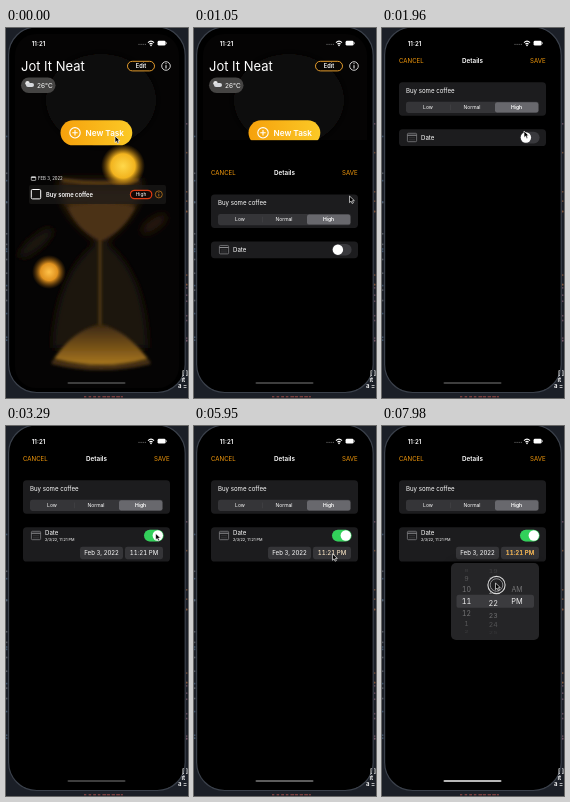
An HTML page for the animation above (8000 ms loop, 182 by 370 pixels).

```html
<!DOCTYPE html>
<html lang="en">
<head>
<meta charset="utf-8">
<title>Task list</title>
<style>
html, body { margin: 0; width: 100%; height: 100%; overflow: hidden; background: #1b1f27; }
svg { display: block; width: 100%; height: 100%; }
text { font-family: Inter, Roboto, "Liberation Sans", sans-serif; font-size: 6.1px; fill: #fff; white-space: pre; }
.b { font-weight: 600; }
.m { text-anchor: middle; }
.o { fill: #f59a0b; }
.tab { font-variant-numeric: tabular-nums; }
.line { fill: none; stroke: #fff; stroke-width: 1; }
</style>
</head>
<body>
<svg viewBox="0 0 182 370" preserveAspectRatio="none">
  <defs>
    <clipPath id="screen"><rect x="9" y="6" width="164" height="354" rx="21"/></clipPath>
    <clipPath id="popClip"><rect x="69" y="137" width="88" height="77" rx="5"/></clipPath>
    <linearGradient id="gold"><stop stop-color="#f6a10c"/><stop offset="1" stop-color="#fbc926"/></linearGradient>
    <linearGradient id="sand" x2="0" y2="1"><stop stop-color="#3a2710"/><stop offset=".6" stop-color="#7a5418"/><stop offset="1" stop-color="#a87720"/></linearGradient>
    <linearGradient id="bulb" x2="0" y2="1"><stop stop-color="#1d140c"/><stop offset=".25" stop-color="#4a3013"/><stop offset="1" stop-color="#2a1a0b"/></linearGradient>
    <radialGradient id="orb"><stop stop-color="#ffd84a"/><stop offset=".55" stop-color="#f2b41f"/><stop offset="1" stop-color="#a86a08" stop-opacity="0"/></radialGradient>
    <radialGradient id="orb2"><stop stop-color="#ffc24a"/><stop offset=".5" stop-color="#e0921f"/><stop offset="1" stop-color="#8a5208" stop-opacity="0"/></radialGradient>
    <filter id="soft" x="-50%" y="-50%" width="200%" height="200%"><feGaussianBlur stdDeviation="4"/></filter>
    <filter id="soft2" x="-50%" y="-50%" width="200%" height="200%"><feGaussianBlur stdDeviation="1.8"/></filter>
  </defs>

  <rect width="182" height="370" fill="#1b1f27"/>
  <g id="code"></g>
  <rect x="2.6" y="-1" width="176.6" height="365.5" rx="28" fill="#000" stroke="#3b414b" stroke-width="1.2"/>
  <g font-family="monospace">
    <text class="b" x="176" y="347" font-size="6">[ ]</text>
    <text class="b" x="175.5" y="354">it</text>
    <text class="b" x="172" y="360">a =</text>
  </g>

  <g clip-path="url(#screen)">
    <rect width="182" height="370" fill="#050404"/>
    <g filter="url(#soft)">
      <ellipse cx="95" cy="72" rx="55" ry="46" fill="#110d0b"/>
      <path d="M52 150H136Q137 184 99 214H91Q54 188 52 150Z" fill="url(#bulb)"/>
      <path d="M90 215H100Q140 245 142 320H46Q50 245 90 215Z" fill="#1c130b"/>
      <ellipse cx="148" cy="196" rx="15" ry="5" fill="#2e1c08" transform="rotate(-35 148 196)"/>
      <ellipse cx="30" cy="215" rx="22" ry="7" fill="#1d1208" transform="rotate(-40 30 215)"/>
    </g>
    <g filter="url(#soft2)">
      <path d="M62 179Q95 171 129 179Q120 200 98 212H92Q70 200 62 179Z" fill="#4c3214"/>
      <path d="M94 212V300" stroke="#5a3c14" stroke-width="2.5"/>
      <path d="M94 296Q120 302 142 331Q96 343 48 331Q66 303 94 296Z" fill="url(#sand)"/>
      <path d="M56 152Q95 158 133 152" fill="none" stroke="#604218" stroke-width="3"/>
      <path d="M46 334Q95 346 144 334" fill="none" stroke="#493012" stroke-width="4"/>
    </g>
    <circle cx="117" cy="138" r="22" fill="url(#orb)"/>
    <circle cx="43" cy="244" r="17" fill="url(#orb2)"/>

    <text x="15" y="42.6" font-size="13" style="font-size:13px">Jot It Neat</text>
    <rect x="121.5" y="33.3" width="27" height="9.6" rx="4.8" fill="#080604" stroke="#e39b2c"/>
    <text class="b m" x="135" y="40.1" style="font-size:5.6px">Edit</text>
    <g><circle class="line" cx="160" cy="38" r="4.3" style="stroke-width:.8"/><path d="M160 37.2V40.5M160 35.2V36.2" class="line"/></g>
    <rect x="15" y="49.5" width="34.5" height="15.5" rx="7.75" fill="#454443"/>
    <circle cx="21.5" cy="55.3" r="2.2" fill="#e8e8e8"/><rect x="20" y="55" width="8" height="4" rx="2" fill="#d6d8dc"/>
    <text x="31" y="59.7" style="font-size:6.5px">26°C</text>

    <rect x="54.5" y="92.3" width="71.8" height="25" rx="12.5" fill="url(#gold)"/>
    <circle class="line" cx="69" cy="104.8" r="5.2" style="stroke-width:1.1"/>
    <path class="line" d="M66.3 104.8H71.7M69 102.1V107.5" style="stroke-width:1.1"/>
    <text class="b" x="79.5" y="107.9" style="font-size:8.2px">New Task</text>

    <rect x="25.3" y="148.6" width="4.4" height="3.8" rx=".6" class="line" style="stroke-width:.6"/>
    <path class="line" d="M25.3 149.5H29.7" style="stroke-width:.8"/>
    <text x="32" y="152.2" style="font-size:4.3px">FEB 3, 2022</text>
    <rect x="23" y="157" width="137" height="19" rx="2" fill="#1c1a19" opacity=".7"/>
    <rect class="line" x="25.3" y="161.5" width="9.4" height="9.4" rx="1.2"/>
    <text class="b" x="40" y="168.5" style="font-size:5.8px">Buy some coffee</text>
    <rect x="124.4" y="162.3" width="21.4" height="8.4" rx="4.2" fill="#120705" stroke="#df3a12" stroke-width="1.2"/>
    <text class="m" x="135" y="168.2" style="font-size:4.8px">High</text>
    <g id="info" stroke="#d0811c" fill="none"><circle cx="152.8" cy="166.4" r="3.5" stroke-width=".7"/><path d="M152.8 165.8V168.4M152.8 164.2V165" stroke-width=".8"/></g>

    <g id="sheet">
      <rect width="182" height="380"/>
      <text class="o" x="17" y="34.7">CANCEL</text>
      <text class="b m" x="90.5" y="34.7" style="font-size:6.3px">Details</text>
      <text class="o" x="148" y="34.7">SAVE</text>
      <rect x="17" y="54.3" width="147" height="33.4" rx="3.6" fill="#1c1c1e"/>
      <text x="24" y="65">Buy some coffee</text>
      <rect x="24" y="73.7" width="133" height="11.3" rx="2.4" fill="#353538"/>
      <rect x="113" y="74.3" width="43.3" height="10.1" rx="2.2" fill="#68686d"/>
      <path d="M68.5 76.5V82.3" stroke="#48484b" stroke-width=".5"/>
      <g class="m"><text x="46" y="81.3" style="font-size:5px">Low</text><text x="90" y="81.3" style="font-size:5px">Normal</text><text class="b" x="134.5" y="81.3" style="font-size:5px">High</text></g>

      <rect id="card" x="17" y="101.2" width="147" height="16.8" rx="3.6" fill="#1c1c1e"/>
      <g fill="none" stroke="#8b8b8e" stroke-width=".7"><rect x="25.4" y="105.3" width="9.2" height="8.4" rx="1"/><path d="M25.4 107.3H34.6" stroke-width="1.1"/><path d="M27.5 109.7H33M27.5 111.8H33" stroke-width=".7" stroke-dasharray="1 1" opacity=".6"/></g>
      <text id="label" x="39" y="111.8">Date</text>
      <rect x="138" y="103.7" width="19.6" height="11.7" rx="5.85" fill="#39393d"/>
      <rect id="green" x="138" y="103.7" width="19.6" height="11.7" rx="5.85" fill="#32d05a"/>
      <circle id="knob" cx="143.9" cy="109.5" r="5.2" fill="#fff"/>
      <g id="extra">
        <text x="39" y="115" style="font-size:3.85px">2/3/22, 11:21 PM</text>
        <rect x="74" y="120.8" width="43" height="12.4" rx="2.4" fill="#353538"/>
        <text class="m" x="95.5" y="129.2">Feb 3, 2022</text>
        <rect x="119" y="120.8" width="38" height="12.4" rx="2.4" fill="#353538"/>
        <text class="m tab" x="138" y="129.2">11:21 PM</text>
        <text id="hot" class="m tab o" x="138" y="129.2">11:21 PM</text>
      </g>
    </g>

    <g id="pop">
      <rect x="69" y="137" width="88" height="77" rx="6" opacity=".5" filter="url(#soft)"/>
      <rect x="69" y="137" width="88" height="77" rx="5" fill="#252527"/>
      <rect x="74.5" y="168.8" width="77.5" height="13" rx="2.6" fill="#3b3b3e"/>
      <g id="wheels" clip-path="url(#popClip)"></g>
    </g>

    <text class="b" x="25.8" y="17.6">11:21</text>
    <path d="M132.5 16.4H140" stroke="#777" stroke-width="1" stroke-dasharray="1 1.1"/>
    <g fill="none" stroke="#fff" stroke-width="1.1"><path d="M142 14.6Q145 11.8 148 14.6M143.4 16.2Q145 14.7 146.6 16.2"/></g>
    <circle cx="145" cy="17.4" r=".8" fill="#fff"/>
    <rect x="151.6" y="12.8" width="8" height="4.8" rx="1.4" fill="#fff"/><rect x="160" y="14.3" width=".8" height="1.8" fill="#aaa"/>
    <rect id="home" x="61.5" y="354" width="58" height="2.1" rx="1"/>
  </g>

  <g id="cursor">
    <g id="ring" fill="none" stroke="#d8d8d8"><circle cx="1" cy="2" r="8.6" fill="#1e1e20" fill-opacity=".75" stroke-width="1.1"/><circle cx="1" cy="2" r="6.3" stroke-width=".8" stroke="#a5a5a7"/></g>
    <path d="M0 0V6.6L1.6 5.1L2.6 7.5L3.9 6.9L2.9 4.7H4.9Z" fill="#000" stroke="#fff" stroke-width=".65"/>
  </g>
</svg>
<script>
const LOOP = 8000, TICK = 70;
const el = id => document.getElementById(id);
const set = (id, attrs) => { for (const k in attrs) el(id).setAttribute(k, attrs[k]); };
const make = (tag, parent, attrs) => {
  const n = document.createElementNS("http://www.w3.org/2000/svg", tag);
  for (const k in attrs) n.setAttribute(k, attrs[k]);
  return parent.appendChild(n);
};
const prog = (t, a, b) => Math.min(1, Math.max(0, (t - a) / (b - a)));
const smooth = p => p * p * (3 - 2 * p);
const mix = (a, b, p) => a + (b - a) * p;

// time, x, y of the pointer tip
const path = [
  [0, 109, 108], [840, 151, 167], [910, 151, 167], [1190, 160, 169], [1330, 160, 169],
  [1750, 144, 93], [1960, 142, 103], [2240, 148, 107], [2520, 148, 107], [2730, 150, 107],
  [3220, 150, 107], [4060, 131, 127], [4550, 104, 128], [4620, 104, 128], [5040, 138, 127],
  [5880, 138, 127], [6160, 141, 131.5], [6650, 141, 131.5], [7000, 113, 179], [7070, 113, 179],
  [7210, 113, 173], [7280, 113, 173], [7980, 113.5, 157], [LOOP, 113.5, 157]
];
function pointer(t) {
  const i = path.findIndex(k => k[0] > t);
  const a = path[i - 1], b = path[i], p = smooth(prog(t, a[0], b[0]));
  return [mix(a[1], b[1], p), mix(a[2], b[2], p)];
}

// Editor text peeking out around the phone
let seed = 7;
const rnd = () => (seed = seed * 16807 % 2147483647) / 2147483647;
const tones = ["#7d5a6c", "#4f6a86", "#8a5a3c", "#6b6f78"];
for (let i = 0; i < 34; i++)
  make("rect", el("code"), { x: i % 2 ? 0 : 180, y: 95 + rnd() * 235, width: 1.4, height: 1.6, fill: tones[i % 4], opacity: .7 });
for (let i = 0; i < 9; i++)
  make("rect", el("code"), { x: 78 + i * 4.6, y: 368, width: 2 + rnd() * 2, height: 1.4, fill: "#7a3f3f" });

// Picker wheels: column centre, current value, text for a value
const hour = n => String((n + 11) % 12 + 1);
const minute = n => String(n).padStart(2, "0");
const half = n => n === 0 ? "AM" : n === 1 ? "PM" : "";
const wheels = [[84.5, 11, hour], [111.3, 21, minute], [135, 1, half]].map(([x, value, name]) => ({
  x, value, name,
  rows: Array.from({ length: 9 }, () => make("text", el("wheels"), { class: "m tab", style: "font-size:7.4px" }))
}));
function turn(w, value) {
  const base = Math.round(value);
  w.rows.forEach((row, i) => {
    const n = base + i - 4, d = n - value, ang = d * .34, far = Math.abs(d);
    const fade = far < 1 ? mix(.92, .36, Math.max(0, far * 1.4 - .4)) : Math.max(0, .36 - (far - 1) * .13);
    row.textContent = w.name(n);
    row.setAttribute("transform", `translate(${w.x} ${175.4 + 36 * Math.sin(ang)}) scale(${far > .5 ? .93 : 1} ${Math.max(.01, Math.cos(ang))})`);
    row.setAttribute("y", 2.65);
    row.setAttribute("opacity", Math.abs(ang) > 1.3 ? 0 : fade);
  });
}

function draw(t) {
  const [x, y] = pointer(t);
  set("cursor", { transform: `translate(${x} ${y})` });
  set("ring", { opacity: t >= 7350 ? 1 : 0 });
  set("info", { opacity: t >= 840 ? .3 : 1 });

  // Sheet rises as a critically damped spring
  const s = Math.max(0, t - 930) * .0192;
  const drop = t >= 1680 ? 0 : 340 * (1 + s) * Math.exp(-s);
  set("sheet", { transform: `translate(0 ${drop})`, visibility: t >= 980 ? "visible" : "hidden" });

  const on = smooth(prog(t, 2520, 2730));
  set("card", { height: mix(16.8, 34.3, on) });
  set("label", { y: mix(111.8, 109.3, on) });
  set("green", { opacity: on });
  set("knob", { cx: mix(143.9, 151.8, on) });
  set("extra", { opacity: on });

  const hot = prog(t, 5880, 6160);
  set("hot", { opacity: hot });
  const g = Math.round(mix(62, 182, hot));
  set("home", { fill: `rgb(${g},${g},${g})` });

  const open = smooth(prog(t, 6230, 6510)), k = mix(.3, 1, open);
  set("pop", { opacity: open, transform: `translate(138 133) scale(${k}) translate(-138 -133)` });

  const drag = t >= 7350 ? Math.max(0, 169 - y) / 14 : 0;
  wheels.forEach((w, i) => turn(w, w.value + (i === 1 ? drag : 0)));
}

const start = performance.now();
function frame() {
  const t = (performance.now() - start) % LOOP;
  draw(Math.floor(t / TICK) * TICK);
  requestAnimationFrame(frame);
}
frame();
</script>
</body>
</html>
```
